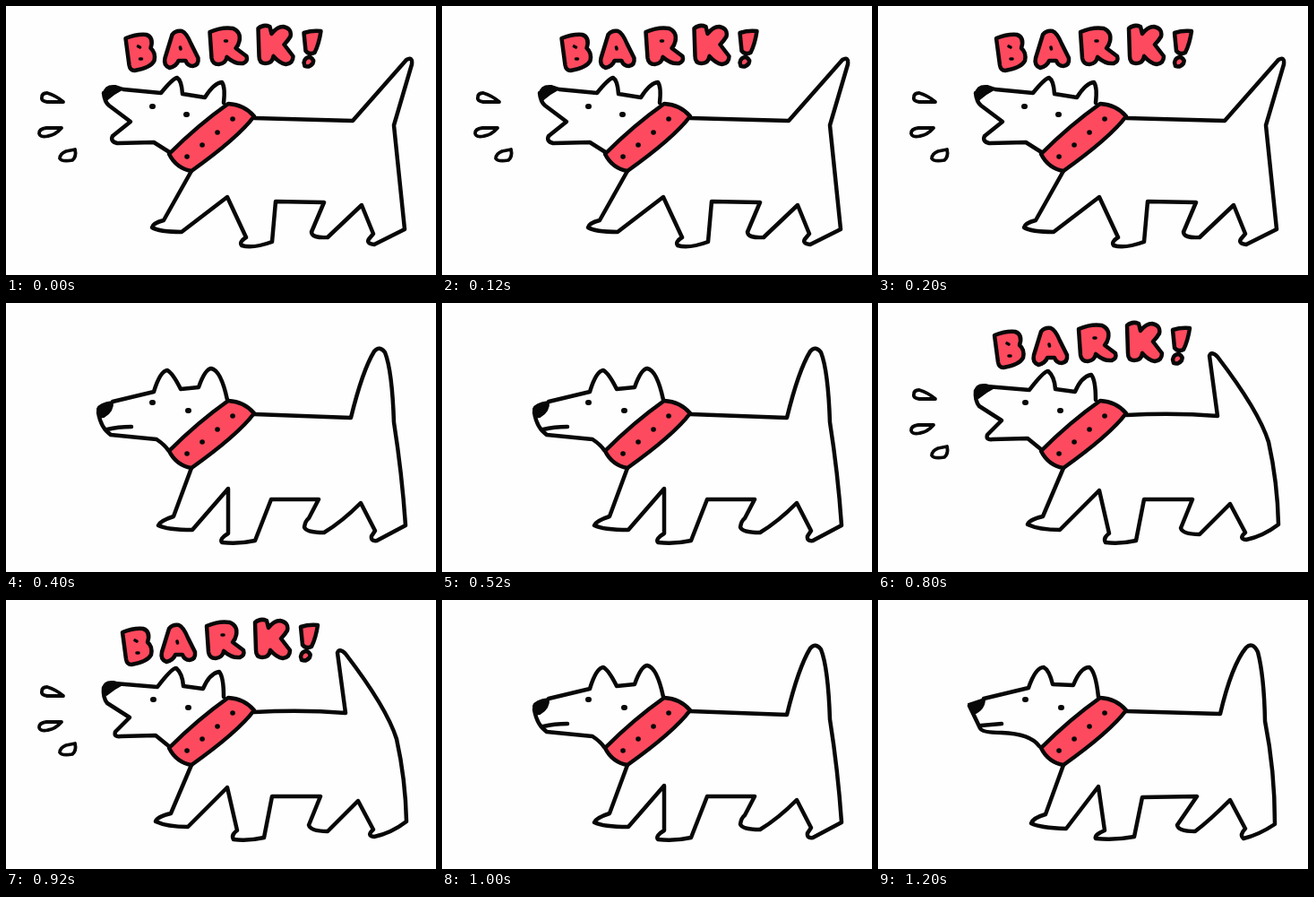
Animation, 480 px wide and 300 px high, one loop 1.4 s. Source, as an HTML page:

```html
<!DOCTYPE html>
<html lang="en">
<head>
<meta charset="utf-8">
<title>Barking dog</title>
<style>
html, body { margin: 0; width: 100%; height: 100%; overflow: hidden; background: #fefefe; }
svg { display: block; width: 100%; height: 100%; filter: blur(.6px); }
path { fill: none; stroke: #080808; stroke-width: 4.5; stroke-linecap: round; stroke-linejoin: round; }
.red { fill: #fe4a5e; }
.ink { fill: #080808; stroke-width: 2; }
.dot { stroke-width: 5.6; }
.eye { stroke-width: 6; }
.hole { stroke-width: 3.6; }
.drop { stroke-width: 3.8; }
</style>
</head>
<body>
<svg viewBox="0 0 480 300" role="img" aria-label="A dog barks: BARK!"></svg>
<script>
const svg = document.querySelector('svg');
const NS = svg.namespaceURI;
const STEP = 200;

// Pose and sideways wobble of the word for each step
const STEPS = [
  ['bark', 1.5], ['bark', 0], ['restA'], ['restB'],
  ['wag', -2], ['restA'], ['restB']
];

const COLLAR = 'M182 165Q214 133 248 109Q266 110 277 123Q259 147 207 184Q190 181 182 165Z';
const STUDS = 'M202 168h.1M219 155h.1M236 141h.1M253 126h.1';

const LETTERS = [
  'M132 36Q145 31 155 32Q164 35 160 47Q166 52 164 61Q160 69 142 72Q137 72 136 66Z',
  'M184 32Q188 27 195 28Q200 30 205 42L213 58Q214 66 207 67Q201 67 199 61L191 61Q189 67 181 69Q174 66 176 58Z',
  'M226 29Q240 23 252 25Q261 29 259 39Q258 44 255 47L267 56Q269 62 263 64Q254 65 245 57Q244 64 236 65Q229 65 228 58Z',
  'M280 25Q286 20 293 23L295 31Q301 23 308 23Q318 25 316 34Q313 39 309 43L319 56Q319 64 311 65Q304 64 297 56Q296 64 288 64Q281 64 281 56Z',
  'M331 30Q340 27 350 28Q348 42 343 52Q337 55 333 50Z',
  'M331 63Q332 57 338 57Q343 60 341 64Q337 69 332 67Z'
];
const HOLES = 'M146 45l2 1M148 59h2M193 46l.5 2M243 39h2';
const DROPS = 'M46 97Q40 97 40 102Q39 106 46 107L64 107Q56 100 46 97Z' +
  'M37 142Q37 137 45 136L62 136Q55 144 47 145Q38 147 37 142Z' +
  'M60 170Q60 165 67 162L77 160Q79 168 74 172Q62 174 60 170Z';

const POSES = {
  bark: {
    head: 'M131 93L173 97Q186 81 191 80Q196 83 197 98L222 102Q232 86 241 85Q245 90 243 108' +
      'M109 97Q110 107 115 111L139 129L119 145Q116 151 124 153L165 152L184 164',
    nose: 'M109 98Q110 88 122 89L131 92Q121 97 112 105Z',
    eyes: 'M163 112h1M201 121h1',
    body: 'M277 125L387 128L447 60Q454 56 453 65L433 133L445 249L411 266Q402 265 405 260L410 254L397 222L359 258Q341 259 341 252' +
      'L355 219L301 218L297 263Q275 271 263 267Q260 263 268 258L247 213L196 252Q171 252 163 247Q164 242 176 239L207 184',
    call: true
  },
  wag: {
    head: 'M121 93L169 97Q185 76 190 76Q197 82 198 96L220 99Q227 82 238 80Q243 86 243 108' +
      'M109 98Q108 109 113 115L138 131L122 147Q120 153 128 152L167 151L183 164',
    nose: 'M108 99Q109 90 120 91L130 94Q120 99 112 106Z',
    eyes: 'M164 111h1M203 120h1',
    body: 'M277 125Q330 122 379 126L370 59Q372 53 379 60Q425 120 436 155Q446 200 447 247Q430 260 411 264Q402 263 410 256' +
      'L393 224L359 258Q340 258 338 251L351 219L297 219L288 265Q270 269 254 267Q251 262 258 257L247 209L203 253' +
      'Q180 253 167 247Q168 242 184 238L207 184',
    call: true
  },
  restA: {
    head: 'M119 110L165 99Q172 76 180 75Q186 78 195 96L215 94Q222 74 229 73Q240 75 247 108' +
      'M103 122Q106 140 117 147L168 152Q177 158 181 164M113 141Q125 138 140 138',
    nose: 'M102 118Q104 112 119 110Q120 121 109 127Q102 129 102 118Z',
    eyes: 'M163 111h1M203 120h1',
    body: 'M277 124L385 128Q398 75 411 54Q417 47 423 55Q431 75 433 133Q442 190 446 248L414 265Q407 266 408 260L412 254' +
      'L396 223Q375 244 355 256Q335 256 333 250Q334 243 338 240L349 219L296 219L278 265Q260 269 241 267' +
      'Q238 263 248 257L248 207L208 253Q180 253 170 248Q172 243 187 238L207 184'
  },
  restB: {
    head: 'M118 110L168 98Q176 75 185 75Q191 78 195 94L218 95Q226 75 236 75Q243 80 246 108' +
      'M102 118L114 143Q116 148 138 148Q170 149 180 163M115 140L138 138',
    nose: 'M101 116L119 110Q119 122 107 127Z',
    eyes: 'M164 111h1M204 120h1',
    body: 'M277 124L382 127Q395 72 411 53Q418 46 424 58Q431 85 432 135Q443 190 443 250Q425 262 408 266Q403 262 410 255' +
      'L393 223Q370 246 354 258Q335 258 334 251L356 219L295 220L286 264Q265 268 243 266Q241 262 253 257' +
      'L246 208L210 255Q180 254 171 249Q173 243 187 239L207 184'
  }
};

function group() {
  return svg.appendChild(document.createElementNS(NS, 'g'));
}

function draw(parent, d, cls = '') {
  const path = document.createElementNS(NS, 'path');
  path.setAttribute('d', d);
  path.setAttribute('class', cls);
  parent.appendChild(path);
}

function buildDog(pose) {
  const g = group();
  draw(g, pose.body);
  draw(g, pose.head);
  draw(g, pose.nose, 'ink');
  draw(g, pose.eyes, 'eye');
  draw(g, COLLAR, 'red');
  draw(g, STUDS, 'dot');
  if (pose.call) draw(g, DROPS, 'drop');
  return g;
}

function buildWord() {
  const g = group();
  LETTERS.forEach(d => draw(g, d, 'red'));
  draw(g, HOLES, 'hole');
  return g;
}

const dogs = Object.fromEntries(Object.entries(POSES).map(([name, pose]) => [name, buildDog(pose)]));
const word = buildWord();

function show(now) {
  const [current, shift = 0] = STEPS[Math.floor(now / STEP) % STEPS.length];
  for (const name in dogs) dogs[name].style.display = name === current ? '' : 'none';
  word.style.display = POSES[current].call ? '' : 'none';
  word.setAttribute('transform', `translate(${shift} 0)`);
}

const start = performance.now();
function tick() {
  show(performance.now() - start);
  requestAnimationFrame(tick);
}
tick();
</script>
</body>
</html>
```
